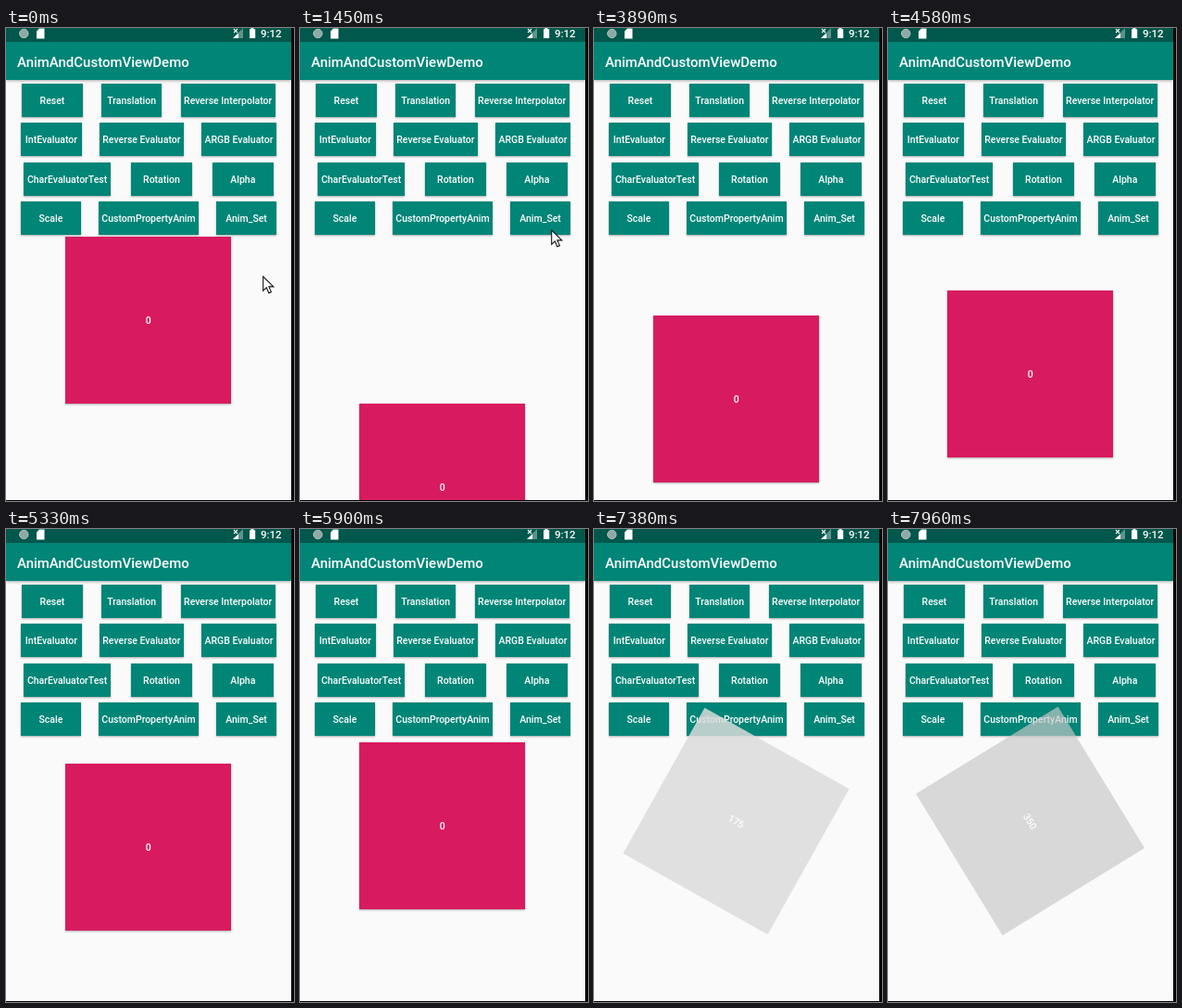
An HTML page for the animation above (8000 ms loop, 311x510 px).

```html
<!DOCTYPE html>
<html lang="en">
<head>
<meta charset="utf-8">
<title>AnimAndCustomViewDemo</title>
<style>
html, body { margin: 0; width: 100%; height: 100%; overflow: hidden; background: #000; }
#stage { position: absolute; left: 0; top: 0; width: 311px; height: 510px; overflow: hidden;
  font: 500 10.5px/1 Roboto, sans-serif; color: #fff; }
#screen { position: absolute; left: 0; top: 0; width: 308px; height: 509px; overflow: hidden; background: #fafafa; }
#bar { position: absolute; left: 0; top: 0; width: 308px; height: 56px; background: #008577;
  box-shadow: 0 1px 3px rgba(0,0,0,.32); }
#status { height: 14.5px; background: #00574b; }
#status svg { position: absolute; left: 0; top: 0; }
#clock { position: absolute; left: 275px; top: 0; font-size: 11.5px; line-height: 12px; }
#title { position: absolute; left: 12px; top: 27px; font-size: 15px; line-height: 20px; white-space: nowrap; }
.row { position: absolute; left: 0; width: 308px; display: flex; justify-content: space-evenly; }
.btn { box-sizing: border-box; min-width: 65.5px; height: 35.5px; margin: 0 3px; padding: 1px 3.5px 0;
  line-height: 36px; text-align: center; white-space: nowrap;
  background: #008577; box-shadow: 0 1px 2px rgba(0,0,0,.32); }
#box { position: absolute; left: 64px; top: 225px; width: 179.4px; height: 180px;
  line-height: 181px; text-align: center; }
#cursor { position: absolute; left: 0; top: 0; }
</style>
</head>
<body>
<div id="stage">
  <div id="screen">
    <div id="bar">
      <div id="status">
        <svg width="308" height="14">
          <circle cx="19.300" cy="6" r="4.700" fill="#8fa9a4" stroke="#b4c6c2"/>
          <path d="M36 .5h5.500v11h-8.500v-8z" fill="#fff"/>
          <path d="M256 0v11h-11z" fill="#5f928a"/>
          <path d="M251 5.500v5.500h-6z" fill="#fff"/>
          <path d="M246 1l4 4m0-4l-4 4" stroke="#fff" stroke-width="1.100"/>
          <path d="M264.500 0h3v1.200h1.700v9.800h-6.200v-9.800h1.500z" fill="#fff"/>
        </svg>
        <span id="clock">9:12</span>
      </div>
      <div id="title">AnimAndCustomViewDemo</div>
    </div>
    <div id="box"></div>
  </div>
  <svg id="cursor" width="14" height="21">
    <path d="M.7 1v15.200l3.600-3.300 2.500 5.800 2.600-1.100-2.500-5.700h4.900z" fill="#fff" stroke="#111" stroke-width="1.100"/>
  </svg>
</div>
<script>
const LOOP = 8000;
const CLICK = 1450;                 // box jumps down, then glides back
const HOME = 6022;                  // glide ends
const SPIN = 6124, SPIN_MS = 4757;  // turn, fade and count
const STALL_END = 6580;             // first turned picture appears
const SIZE = 180, SPEED = 0.04;

const box = document.getElementById('box');
const cursor = document.getElementById('cursor');

function add(parent, className, text = '') {
  const el = document.createElement('div');
  el.className = className;
  el.textContent = text;
  return parent.appendChild(el);
}

const labels = [
  ['Reset', 'Translation', 'Reverse Interpolator'],
  ['IntEvaluator', 'Reverse Evaluator', 'ARGB Evaluator'],
  ['CharEvaluatorTest', 'Rotation', 'Alpha'],
  ['Scale', 'CustomPropertyAnim', 'Anim_Set']
];
labels.forEach((names, i) => {
  const row = add(box.parentNode, 'row');
  row.style.top = Math.round(60 + 42.25 * i) + 'px';
  names.forEach(name => add(row, 'btn', name));
});
box.parentNode.append(box);

const path = [
  { t: 120, x: 277, y: 267 },
  { t: 210, x: 266, y: 267 },
  { t: 700, x: 276, y: 334 },
  { t: 1140, x: 266, y: 208 },
  { t: 1270, x: 262, y: 202 },
  { t: CLICK, x: 271, y: 217 },
  { t: 1900, x: 312, y: 236 }
];
function pointer(t) {
  const i = path.findIndex(p => p.t > t);
  if (i === 0) return path[0];
  if (i < 0) return path[path.length - 1];
  const a = path[i - 1], b = path[i];
  const k = (t - a.t) / (b.t - a.t);
  return { x: a.x + (b.x - a.x) * k, y: a.y + (b.y - a.y) * k };
}

function drawGlide(t) {
  const drop = t < CLICK ? 0 : Math.max(0, Math.min(SIZE, SPEED * (HOME - t)));
  box.style.transform = `translateY(${Math.round(drop)}px)`;
  box.style.background = '#d81b60';
  box.style.boxShadow = '0 1px 2px rgba(0,0,0,.32)';
  box.style.opacity = 1;
  box.textContent = 0;
}

function drawSpin(t) {
  const f = t < STALL_END ? 0 : (1 - Math.cos(Math.PI * (t - SPIN) / SPIN_MS)) / 2;
  const grey = Math.round(240.5 - 125 * f);
  box.style.transform = `rotate(${180 * f}deg)`;
  box.style.background = `rgb(${grey},${grey},${grey})`;
  box.style.boxShadow = 'none';
  box.style.opacity = 1 - f;
  box.textContent = f ? Math.floor(1 + 1074 * f) : 0;
}

function draw(t) {
  (t < SPIN ? drawGlide : drawSpin)(t);
  const p = pointer(t);
  cursor.style.transform = `translate(${Math.round(p.x)}px,${Math.round(p.y)}px)`;
}

const start = performance.now();
function tick() {
  draw((performance.now() - start) % LOOP);
  requestAnimationFrame(tick);
}
tick();
</script>
</body>
</html>
```
